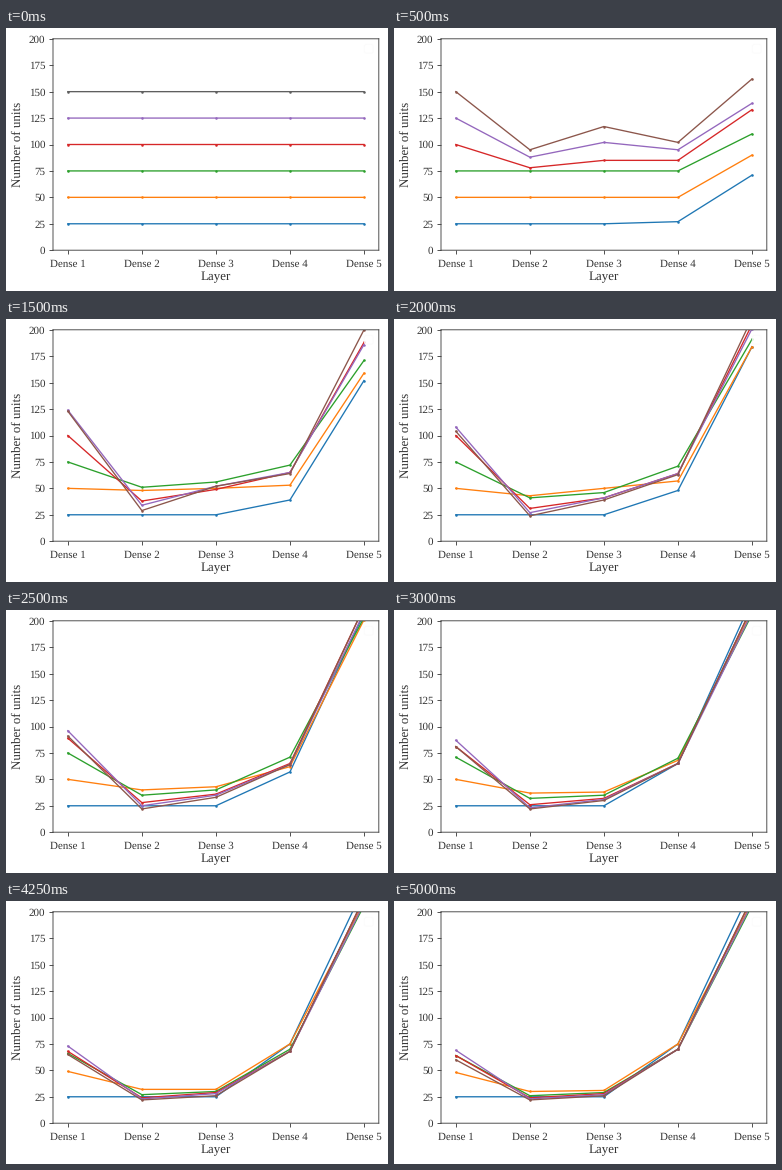
Write a matplotlib script that moves like this. It is 382x263 px and loops after 5250 ms.

```python
import math

import matplotlib.pyplot as plt
from matplotlib.animation import FuncAnimation

W, H, DPI = 382, 263, 80
FRAMES, INTERVAL = 21, 250
LEFT, RIGHT, TOP, BOTTOM = 47, 372.8, 10.8, 222.2
INK, AXIS = "#333333", "#404040"

plt.rcParams.update({
    "font.family": "Liberation Serif",
    "font.size": 10,
    "text.hinting": "none",
    "text.hinting_factor": 1,
    "path.snap": False,
    "axes.linewidth": 0.8,
    "axes.edgecolor": AXIS,
    "xtick.color": AXIS,
    "ytick.color": AXIS,
    "xtick.labelcolor": INK,
    "ytick.labelcolor": INK,
    "xtick.major.pad": 4.4,
})

# Colour, starting width, and where the first and last layers settle.
SERIES = [
    ("#1f77b4", 25, 25, 223),
    ("#ff7f0e", 50, 47, 209),
    ("#2ca02c", 75, 60, 206),
    ("#d62728", 100, 56, 213),
    ("#9467bd", 125, 60, 208),
    ("#8c564b", 150, 50, 213),
]


def decay(start, end, t, tau):
    """Fall exponentially to end; never rise."""
    end = min(start, end)
    return end + (start - end) * math.exp(-max(t, 0) / tau)


def sine_out(start, end, t, span):
    u = min(max(t / span, 0), 1)
    return start + (end - start) * math.sin(math.pi / 2 * u)


def smooth(start, end, t, span):
    u = min(max(t / span, 0), 1)
    return start + (end - start) * u * u * (3 - 2 * u)


def fourth(start, t, lag):
    """Narrow nets widen; wide ones drop, then drift up to 70."""
    if start < 70:
        wait = 0.12 * (start - 25)
        return smooth(start, 75, t - wait, 17 - wait)
    sag = 0.6 * (FRAMES - 1 - t) if start > 75 else 0
    return decay(start, 70 - sag, t - lag, 170 / (start - 22))


def units(start, first, last, t):
    """Wider nets react sooner and faster in the falling layers."""
    lag = max(1, 9.5 - 0.085 * start)
    late = 1 if start > 100 else 0
    values = [
        decay(start, first, t - (16.5 - 0.085 * start), 7),
        decay(start, 29 - 0.05 * start, t - lag, 230 / (start - 22)),
        decay(start, 30 - 0.03 * start, t - max(1, 17 - 0.18 * start),
              6.2 - 0.02 * start),
        fourth(start, t, lag),
        sine_out(start, last, t - late, 14.5 - 0.04 * start),
    ]
    return [round(v) for v in values]


fig = plt.figure(figsize=(W / DPI, H / DPI), dpi=DPI, facecolor="white")
ax = fig.add_axes([LEFT / W, 1 - BOTTOM / H,
                   (RIGHT - LEFT) / W, (BOTTOM - TOP) / H])
ax.set_xlim(-0.2, 4.2)
ax.set_ylim(0, 200)
ax.set_xticks(range(5), [f"Dense {i}" for i in range(1, 6)])
ax.set_yticks(range(0, 201, 25))
ax.legend(handles=[], loc="upper right", edgecolor="0.985")


def label(x, y, text, **kw):
    fig.text(x / W, 1 - y / H, text, size=11.6, color=INK,
             ha="center", va="center", **kw)


label(210, 249.5, "Layer")
label(12, 116.5, "Number of units", rotation=90)

lines = [ax.plot(range(5), [start] * 5, color=color, lw=1.2,
                 marker="o", ms=2.3, mew=0)[0]
         for color, start, *_ in SERIES]


def update(k):
    for line, (_, *params) in zip(lines, SERIES):
        line.set_ydata(units(*params, k))
    # The top line is grey until it starts to move.
    lines[-1].set_color("#5f5f5f" if k < 2 else SERIES[-1][0])
    return lines


anim = FuncAnimation(fig, update, frames=FRAMES, interval=INTERVAL,
                     repeat=True, repeat_delay=0, blit=False)
plt.show()
```
